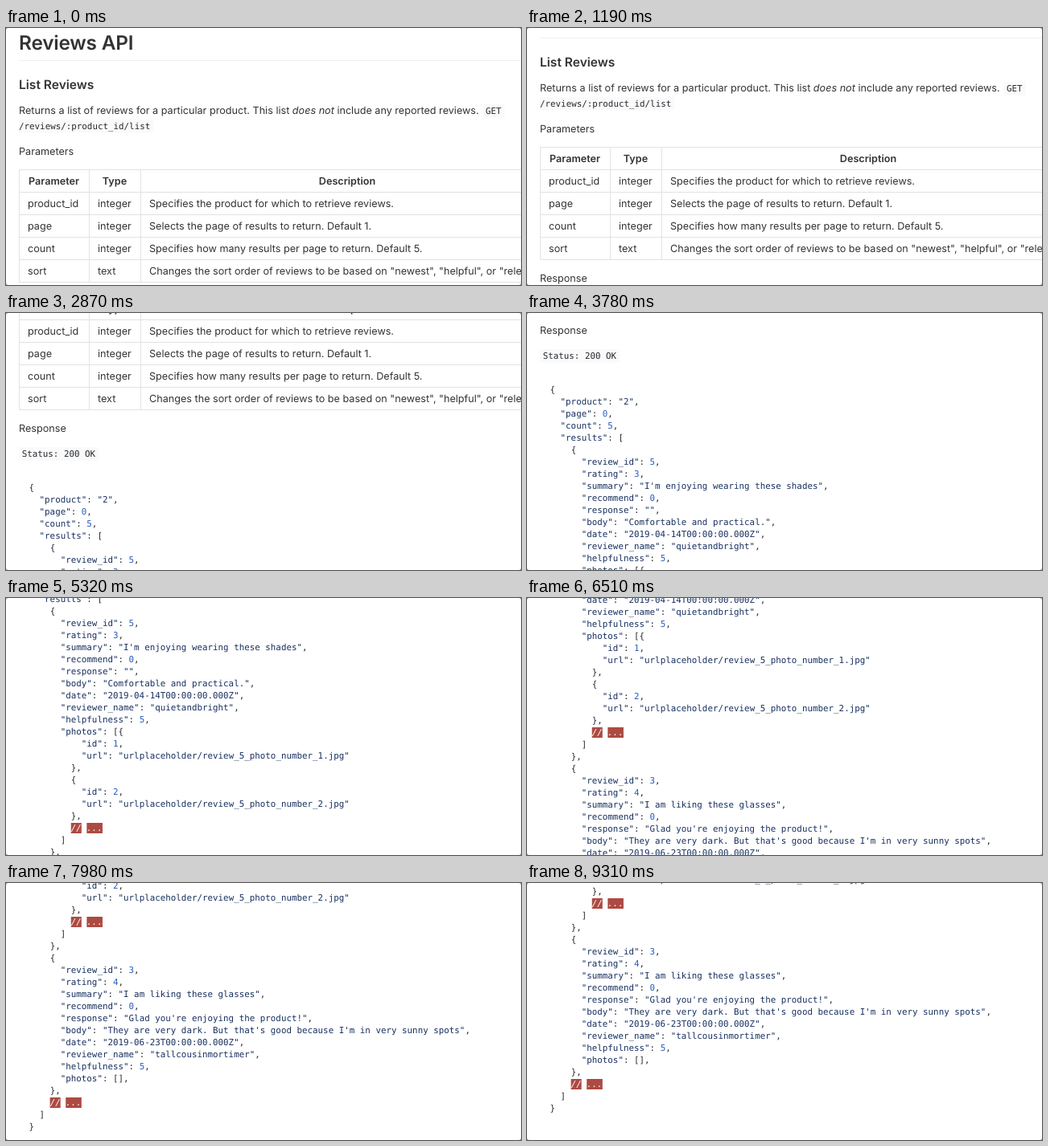
An HTML page for the animation above (9.38 s loop, 640 px wide and 320 px high).

```html
<!DOCTYPE html>
<html lang="en">
<head>
<meta charset="utf-8">
<title>Reviews API</title>
<style>
  html, body { margin: 0; width: 100%; height: 100%; overflow: hidden; background: #8c8c8c; }
  svg { display: block; width: 640px; height: 320px; background: #fff; border-radius: 3px; }
  text { font: 12.63px Inter, sans-serif; fill: #333; white-space: pre; text-rendering: geometricPrecision; }
  .h1 { font-size: 24.4px; font-weight: 600; letter-spacing: -.2px; }
  .h3 { font-size: 15.55px; font-weight: 600; }
  .th { font-weight: 600; text-anchor: middle; }
  .code { font: 10.85px "DejaVu Sans Mono", monospace; fill: #24292e; }
  .str { fill: #183060; }
  .num { fill: #2a5cbd; }
  .bad { fill: #fafbfc; font-style: italic; }
  .mark { fill: #ad4a41; }
  .chip { fill: #fafafa; }
  .em { font-style: italic; }
  .rule { stroke: #f0f0f0; }
  .cell { stroke: #e2e2e2; }
</style>
</head>
<body>
<svg viewBox="0 0 640 320"><g id="page"></g></svg>
<script>
const NS = 'http://www.w3.org/2000/svg';
const page = document.getElementById('page');
const CHAR = 10.85 * 0.602;

function add(parent, tag, attrs, content) {
  const el = document.createElementNS(NS, tag);
  for (const k in attrs) el.setAttribute(k, attrs[k]);
  if (content !== undefined) el.textContent = content;
  parent.appendChild(el);
  return el;
}
const text = (x, y, s, cls = '') => add(page, 'text', { x, y, class: cls }, s);
const line = (x1, y1, x2, y2, cls) => add(page, 'line', { x1, y1, x2, y2, class: cls });
const rect = (x, y, width, height, cls) => add(page, 'rect', { x, y, width, height, class: cls });

// Inline code on a faint tint
function inlineCode(x, y, s, padLeft = 4) {
  rect(x - padLeft, y - 12, s.length * CHAR + padLeft + 4, 17, 'chip');
  text(x, y, s, 'code');
}

// Heading and introduction
text(16, 27, 'Reviews API', 'h1');
line(16, 40.5, 640, 40.5, 'rule');
text(16, 76, 'List Reviews', 'h3');
inlineCode(596, 107, 'GET');
inlineCode(16, 125.6, '/reviews/:product_id/list', 0);
const intro = text(16, 107, 'Returns a list of reviews for a particular product. This list ');
add(intro, 'tspan', { class: 'em' }, 'does not');
add(intro, 'tspan', {}, ' include any reported reviews.');
text(16, 158, 'Parameters');

// Parameter table
const rows = [
  ['product_id', 'integer', 'Specifies the product for which to retrieve reviews.'],
  ['page', 'integer', 'Selects the page of results to return. Default 1.'],
  ['count', 'integer', 'Specifies how many results per page to return. Default 5.'],
  ['sort', 'text', 'Changes the sort order of reviews to be based on "newest", "helpful", or "relevant"']
];
for (let i = 0; i < 6; i++) line(16, 176.5 + 28 * i, 680, 176.5 + 28 * i, 'cell');
for (const x of [16.5, 103.5, 167.5]) line(x, 176, x, 317, 'cell');
text(59.5, 195, 'Parameter', 'th');
text(135, 195, 'Type', 'th');
text(424, 195, 'Description', 'th');
rows.forEach((row, i) => row.forEach((s, c) => text([27, 114, 178][c], 223 + 28 * i, s)));

// Response
text(16, 344, 'Response');
inlineCode(19.7, 375, 'Status: 200 OK');

const json = `{
  "product": "2",
  "page": 0,
  "count": 5,
  "results": [
    {
      "review_id": 5,
      "rating": 3,
      "summary": "I'm enjoying wearing these shades",
      "recommend": 0,
      "response": "",
      "body": "Comfortable and practical.",
      "date": "2019-04-14T00:00:00.000Z",
      "reviewer_name": "quietandbright",
      "helpfulness": 5,
      "photos": [{
          "id": 1,
          "url": "urlplaceholder/review_5_photo_number_1.jpg"
        },
        {
          "id": 2,
          "url": "urlplaceholder/review_5_photo_number_2.jpg"
        },
        // ...
      ]
    },
    {
      "review_id": 3,
      "rating": 4,
      "summary": "I am liking these glasses",
      "recommend": 0,
      "response": "Glad you're enjoying the product!",
      "body": "They are very dark. But that's good because I'm in very sunny spots",
      "date": "2019-06-23T00:00:00.000Z",
      "reviewer_name": "tallcousinmortimer",
      "helpfulness": 5,
      "photos": [],
    },
    // ...
  ]
}`;

function kind(token) {
  if (token[0] === '"') return 'str';
  if (/^\d/.test(token)) return 'num';
  return /^(\/\/|\.\.\.)/.test(token) ? 'bad' : '';
}

json.split('\n').forEach((src, i) => {
  const x = 28.5 + src.search(/\S/) * CHAR;
  const y = 417 + 15 * i;
  const tokens = src.trim().match(/"[^"]*"|\d+|\/\/|\.\.\.|[^"\d\/.]+/g);
  let col = 0;
  for (const t of tokens) {
    if (kind(t) === 'bad') rect(x + col * CHAR, y - 10, t.length * CHAR, 13, 'mark');
    col += t.length;
  }
  const el = text(x, y, '', 'code');
  for (const t of tokens) add(el, 'tspan', { class: kind(t) }, t);
});

// Scrolling: [time, offset] points joined by a smooth monotone curve
const LOOP = 9380, STEP = 70;
const keys = [
  [0, 0], [840, 0], [1820, 128], [2380, 188], [2660, 188], [3780, 318], [4270, 380],
  [4690, 380], [5320, 472], [6510, 591], [6650, 591], [7630, 669], [7980, 710],
  [8330, 733], [LOOP, 733]
];
const rate = i => (keys[i + 1][1] - keys[i][1]) / (keys[i + 1][0] - keys[i][0]);
const slopes = keys.map((k, i) => {
  if (i === 0 || i === keys.length - 1) return 0;
  const a = rate(i - 1), b = rate(i);
  return a * b > 0 ? 2 * a * b / (a + b) : 0;
});

function scrollAt(t) {
  let i = 0;
  while (i < keys.length - 2 && t >= keys[i + 1][0]) i++;
  const [t0, s0] = keys[i], [t1, s1] = keys[i + 1];
  const h = t1 - t0, u = (t - t0) / h, v = 1 - u;
  return s0 * (1 + 2 * u) * v * v + s1 * u * u * (3 - 2 * u)
    + h * u * v * (slopes[i] * v - slopes[i + 1] * u);
}

function draw(ms) {
  const t = Math.floor((ms % LOOP) / STEP) * STEP;
  page.setAttribute('transform', `translate(0 ${-Math.round(scrollAt(t))})`);
}

let start;
function tick(now) {
  if (start === undefined) start = now;
  draw(now - start);
  requestAnimationFrame(tick);
}
draw(0);
requestAnimationFrame(tick);
</script>
</body>
</html>
```
